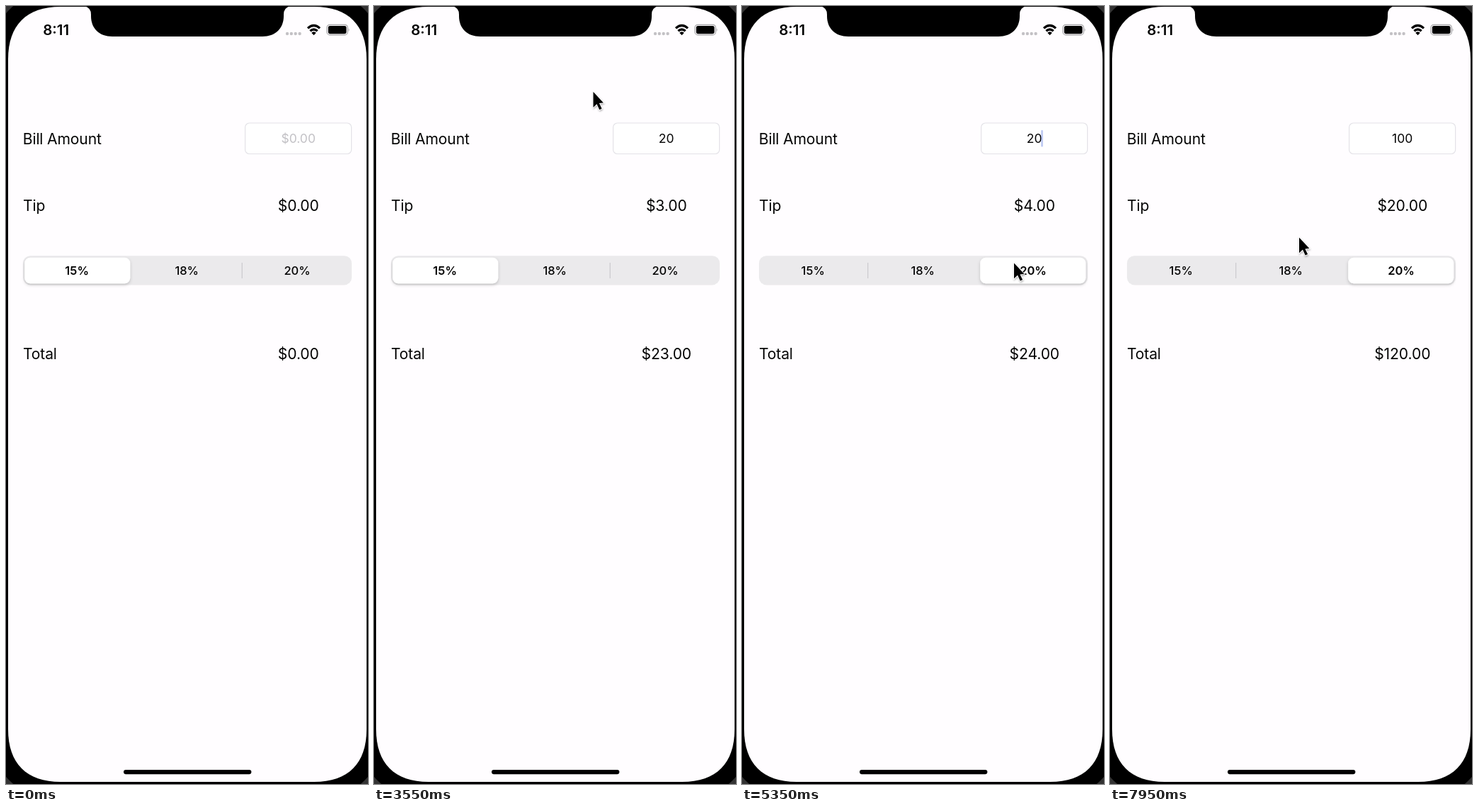
Animation, 511 px wide and 1097 px high, one loop 8000 ms. Source, as an HTML page:

```html
<!DOCTYPE html>
<html lang="en">
<head>
<meta charset="utf-8">
<title>Tip calculator</title>
<style>
  html, body { margin: 0; width: 100%; height: 100%; overflow: hidden; background: #000; }
  svg { display: block; width: 511px; height: 1097px; }
  text { font-family: Inter, Roboto, sans-serif; fill: #050505; }
  .label { font-size: 21.1px; letter-spacing: -0.15px; }
  .sum { font-size: 21.1px; letter-spacing: -0.1px; text-anchor: middle; }
  .seg { font-size: 16.5px; font-weight: 500; text-anchor: middle; }
  .entry { font-size: 17.5px; text-anchor: middle; }
  .time { font-size: 20.5px; font-weight: 600; text-anchor: middle; }
</style>
</head>
<body>
<svg viewBox="0 0 511 1097">
  <defs>
    <filter id="lift" x="-20%" y="-40%" width="140%" height="190%">
      <feDropShadow dx="0" dy="2" stdDeviation="2.2" flood-color="#000" flood-opacity="0.2"/>
    </filter>
    <filter id="drop" x="-40%" y="-30%" width="200%" height="180%">
      <feDropShadow dx="0.5" dy="1.5" stdDeviation="1.3" flood-color="#000" flood-opacity="0.35"/>
    </filter>
  </defs>

  <rect width="511" height="1097" fill="#333"/>
  <rect x="-22" y="-22" width="555" height="1141" rx="92" fill="#000"/>
  <path fill="#fffdff" d="M3 75C3 27 29 1 77 1H435C483 1 509 27 509 75V1020C509 1068 483 1094 435 1094H77C29 1094 3 1068 3 1020Z"/>
  <path d="M110 0Q120 2 120 12V14C120 32 132 43 150 43H362C380 43 392 32 392 14V12Q392 2 402 0Z"/>

  <text class="time" x="70.7" y="41.2">8:11</text>
  <g fill="#c3c1c5">
    <circle cx="397" cy="39" r="2.2"/><circle cx="402.8" cy="39" r="2.2"/>
    <circle cx="408.7" cy="39" r="2.2"/><circle cx="414.6" cy="39" r="2.2"/>
  </g>
  <g fill="none" stroke="#000" stroke-width="3.3">
    <path d="M426 31.4Q434.5 23.6 443 31.4"/>
    <path d="M429.4 35.3Q434.5 30.5 439.6 35.3"/>
    <path d="M434.5 41.2L431.2 37.7Q434.5 34.6 437.8 37.7Z" fill="#000" stroke="none"/>
  </g>
  <rect x="453" y="26.3" width="29.3" height="14.6" rx="4.2" fill="none" stroke="#a5a4a7" stroke-width="1.2"/>
  <rect x="454.8" y="28" width="25.7" height="11.2" rx="2.6"/>
  <path d="M483.6 31.2Q485.6 33.6 483.6 36Z" fill="#a5a4a7"/>

  <text class="label" x="23.8" y="195.4">Bill Amount</text>
  <text class="label" x="24" y="288.6">Tip</text>
  <text class="label" x="24" y="498.4">Total</text>

  <rect x="337.6" y="165" width="150" height="43.5" rx="6" fill="#fff" stroke="#e3e2e7" stroke-width="1.2"/>
  <text class="entry" id="entry" x="412.7" y="193.3"></text>
  <rect id="caret" y="175" width="2.7" height="23.5" rx="1" fill="#3a5ed8"/>
  <text class="sum" id="tip" x="412.8" y="288.6"></text>
  <text class="sum" id="total" x="412.8" y="498.4"></text>

  <rect x="24" y="352.2" width="464" height="41.2" rx="10.5" fill="#ebeaec"/>
  <rect class="bar" x="177" y="362" width="1.3" height="22" fill="#cdccd0"/>
  <rect class="bar" x="332.6" y="362" width="1.3" height="22" fill="#cdccd0"/>
  <rect id="thumb" y="354.7" width="149" height="36.6" rx="8" fill="#fff" filter="url(#lift)"/>
  <text class="seg" x="100.2" y="379">15%</text>
  <text class="seg" x="255.2" y="379">18%</text>
  <text class="seg" x="411" y="379">20%</text>

  <rect x="166" y="1077" width="180.4" height="6.2" rx="3.1"/>
  <path id="cursor" d="M0 0.4V22.2L5 17.6L8.7 25.6L12.1 24L8.4 16.4L14.4 15.8Z"
        fill="#000" stroke="#fff" stroke-width="1.5" paint-order="stroke" filter="url(#drop)"/>
</svg>
<script>
const LOOP = 8000, STEP = 50, SLIDE = 338;
const $ = id => document.getElementById(id);
const entry = $("entry"), caret = $("caret"), thumb = $("thumb"), cursor = $("cursor");
const bars = document.querySelectorAll(".bar"), segs = document.querySelectorAll(".seg");

const clamp = v => Math.max(0, Math.min(1, v));
const ease = u => (1 - Math.cos(Math.PI * clamp(u))) / 2;
const mix = (a, b, p) => a + (b - a) * p;
const money = v => "$" + v.toFixed(2);

// start, end, from, control, to
const moves = [
  [900, 1400, [5, 500], [320, 95], [411, 190]],
  [1450, 1700, [411, 190], [414, 190], [416, 188]],
  [3250, 3450, [416, 188], [400, 90], [345, 41]],
  [3450, 3750, [345, 41], [265, 200], [257, 362]],
  [4350, 4800, [257, 362], [320, 368], [384, 362]],
  [5350, 5700, [384, 362], [425, 300], [430, 210]],
  [5750, 5950, [430, 210], [431, 195], [430, 178]],
  [7650, 7950, [430, 178], [350, 240], [267, 326]]
];
// time, field content
const keys = [[0, ""], [2600, "2"], [2750, "20"], [6150, "2"], [6500, ""],
  [7000, "1"], [7150, "10"], [7250, "100"]];
// time, selected segment
const picks = [[0, 0], [3775, 1], [4950, 2]];
const rates = [0.15, 0.18, 0.2], slots = [26.3, 177.5, 336.2];
const FOCUS = 1750, READY = 1850;

const lastIndex = (list, t) => list.filter(e => e[0] <= t).length - 1;

function drawCursor(t) {
  const m = moves[lastIndex(moves, t)];
  cursor.style.display = m ? "" : "none";
  if (!m) return;
  const u = ease((t - m[0]) / (m[1] - m[0])), v = 1 - u;
  const at = i => v * v * m[2][i] + 2 * u * v * m[3][i] + u * u * m[4][i];
  cursor.setAttribute("transform", `translate(${at(0)} ${at(1)})`);
}

function drawCaret(t, typedAt, text) {
  const since = Math.max(typedAt, READY);
  const phase = (Math.max(0, t - since) % 1000) / 1000;
  const shown = 1 - clamp((phase - 0.5) / 0.15) + clamp((phase - 0.85) / 0.15);
  const home = text ? 411.3 + entry.getComputedTextLength() / 2 : 386.3;
  const x = t < READY ? mix(416, home, ease((t - FOCUS) / (READY - FOCUS))) : home;
  caret.setAttribute("x", x);
  caret.setAttribute("opacity", t < FOCUS ? 0 : shown);
}

function drawSegments(t) {
  const i = lastIndex(picks, t), [start, sel] = picks[i];
  const prev = i ? picks[i - 1][1] : sel;
  const p = i ? ease((t - start) / SLIDE) : 1;
  thumb.setAttribute("x", mix(slots[prev], slots[sel], p));
  bars.forEach((bar, k) => {
    const open = s => s === k || s === k + 1 ? 0 : 1;
    bar.setAttribute("opacity", mix(open(prev), open(sel), p));
  });
  segs.forEach((seg, k) => {
    seg.style.fontWeight = k === (p < 0.5 ? prev : sel) ? 600 : 500;
    seg.setAttribute("opacity", i && k === sel ? mix(0.35, 1, clamp((t - start) / 200)) : 1);
  });
  return rates[sel];
}

function draw(t) {
  const [typedAt, text] = keys[lastIndex(keys, t)];
  entry.textContent = text || "$0.00";
  entry.style.fill = text ? "#050505" : "#c2c1c5";
  const rate = drawSegments(t), bill = Number(text);
  $("tip").textContent = money(bill * rate);
  $("total").textContent = money(bill * (1 + rate));
  drawCaret(t, typedAt, text);
  drawCursor(t);
}

const begin = performance.now();
function tick() {
  const t = (performance.now() - begin) % LOOP;
  draw(Math.floor(t / STEP) * STEP);
  requestAnimationFrame(tick);
}
tick();
</script>
</body>
</html>
```
